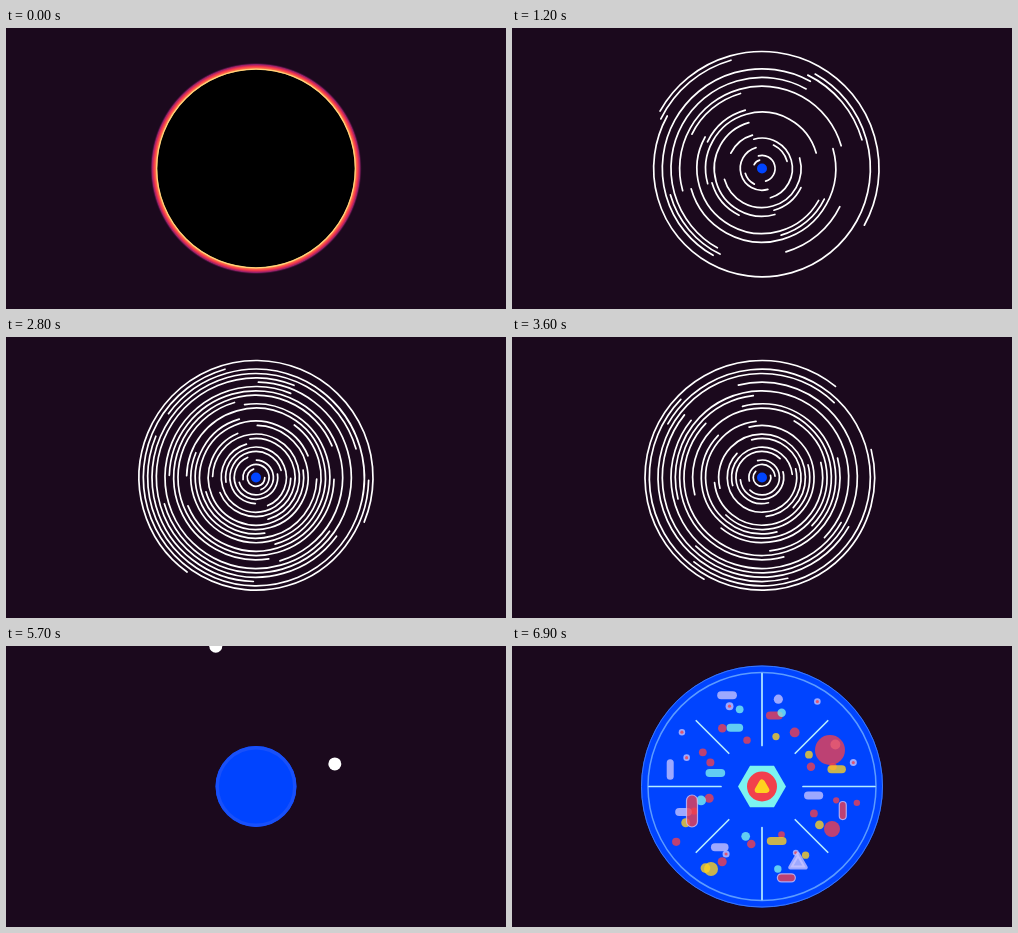
Write an HTML page with a canvas that moves like this. It is 500 px wide and 281 px high and loops after 7 s.

```html
<!DOCTYPE html>
<html>
<head>
<meta charset="utf-8">
<style>
html, body { margin: 0; width: 100%; height: 100%; overflow: hidden; background: #1b091d; }
canvas { display: block; width: 100vw; height: 100vh; }
</style>
</head>
<body>
<canvas id="stage" width="500" height="281"></canvas>
<script>
const canvas = document.getElementById('stage');
const ctx = canvas.getContext('2d');
const W = 500, H = 281, CX = 250, CY = 140.5, TAU = Math.PI * 2;
const BG = '#1b091d', BLUE = '#0044ff', RED = '#f2404c', YELLOW = '#ffd21f',
      CYAN = '#7cf3f0', LILAC = '#c9c4ff', PALE = '#b4ecff';

const rad = deg => deg * Math.PI / 180;
const progress = (t, from, to) => Math.min(1, Math.max(0, (t - from) / (to - from)));
const easeOut = (p, power) => 1 - (1 - p) ** power;
const easeInOut = p => (1 - Math.cos(Math.PI * p)) / 2;

function seeded(seed) {
  return () => (seed = (seed * 16807) % 2147483647) / 2147483647;
}

function disc(x, y, r, color) {
  ctx.fillStyle = color;
  ctx.beginPath();
  ctx.arc(x, y, Math.max(0, r), 0, TAU);
  ctx.fill();
}

function circle(r, color, width) {
  ctx.strokeStyle = color;
  ctx.lineWidth = width;
  ctx.beginPath();
  ctx.arc(CX, CY, Math.max(0, r), 0, TAU);
  ctx.stroke();
}

function polygon(x, y, r, sides, turn, color, rounding = 0) {
  ctx.beginPath();
  for (let i = 0; i < sides; i++) {
    const a = turn + i * TAU / sides;
    ctx.lineTo(x + r * Math.cos(a), y + r * Math.sin(a));
  }
  ctx.closePath();
  ctx.fillStyle = ctx.strokeStyle = color;
  ctx.fill();
  if (!rounding) return;
  ctx.lineWidth = rounding;
  ctx.lineJoin = 'round';
  ctx.stroke();
}

function eclipse() {
  const glow = ctx.createRadialGradient(CX, CY, 98, CX, CY, 106);
  ['#ffc45a', '#ff7a48', '#f5364c', '#96206a', 'rgba(27,9,29,0)']
    .forEach((color, i) => glow.addColorStop(i / 4, color));
  disc(CX, CY, 106, glow);
  disc(CX, CY, 99, '#000');
  circle(99.3, '#ffd27a', 1.3);
}

// Start of each ring in eighths of a turn, outermost first
const STARTS = [7, 2, 3, 0, 1, 4, 1, 6, 0, 2, 4, 6, 3, 2, 0, 4, 2, 6, 4, 2, 6, 0, 2, 4, 6, 2];

// Adds one three-quarter arc to the path; every other ring runs late
function addArc(index, eighth, t) {
  const late = index % 2;
  const head = easeOut(progress(t, late ? 1.03 : 0.13, 4.6), 4);
  const tail = easeInOut(progress(t, 2.5 + 0.45 * late, 5.5 + 0.45 * late));
  if (head - tail < 0.002) return;
  const start = 16 + eighth * 45, r = 117 - index * 4.33;
  const from = -rad(start + 270 * tail), to = -rad(start + 270 * head);
  ctx.moveTo(CX + r * Math.cos(from), CY + r * Math.sin(from));
  ctx.arc(CX, CY, r, from, to, true);
}

function rings(t) {
  ctx.strokeStyle = '#fff';
  ctx.lineWidth = 1.7;
  ctx.lineCap = 'round';
  ctx.beginPath();
  STARTS.forEach((eighth, i) => addArc(i, eighth, t));
  addArc(2, 5, t);
  ctx.stroke();
}

// White balls rush in one after another
function balls(t) {
  [286, 196, 16, 106].forEach((angle, i) => {
    const d = 1640 * (5.672 + 0.039 * i - t);
    if (d > 0 && d < 330) disc(CX + d * Math.cos(rad(angle)), CY - d * Math.sin(rad(angle)), 6.5, '#fff');
  });
}

function pill(x, y, w, h, color, outlined) {
  ctx.beginPath();
  ctx.roundRect(x - w / 2, y - h / 2, w, h, Math.min(w, h) / 2);
  ctx.fillStyle = color;
  ctx.fill();
  if (!outlined) return;
  ctx.strokeStyle = LILAC;
  ctx.lineWidth = 1.2;
  ctx.stroke();
}

// Dots and pills scattered over the eight sectors, in six rows outward
function contents(shown) {
  const random = seeded(4711);
  const colors = [RED, RED, RED, LILAC, LILAC, YELLOW, CYAN];
  ctx.globalAlpha = 0.78 * shown;
  for (let i = 0; i < 48; i++) {
    const row = Math.floor(i / 8);
    const angle = (i % 8 + 0.2 + 0.6 * random()) * TAU / 8;
    const d = 46 + (row + random()) * 9.5;
    const x = CX + d * Math.cos(angle), y = CY + d * Math.sin(angle);
    const color = colors[Math.floor(random() * colors.length)];
    const size = random();
    if (i % 4 === row % 4) {
      const length = 15 + 6 * size, upright = random() < 0.2;
      pill(x, y, upright ? 7 : length, upright ? length : 8, color, color === RED && size > 0.5);
    } else {
      disc(x, y, (3 + 2 * size) * shown, color);
      if (color === LILAC && size < 0.5) disc(x, y, 1.6 * shown, RED);
    }
  }
  disc(318, 104, 15 * shown, RED);
  disc(320, 183, 8 * shown, RED);
  disc(199, 223, 7 * shown, YELLOW);
  pill(180, 165, 11, 32, RED, true);
  polygon(286, 217, 9 * shown, 3, -Math.PI / 2, LILAC, 4);
  ctx.globalAlpha = 1;
}

function spokes(open) {
  ctx.strokeStyle = PALE;
  ctx.lineWidth = 1.7;
  ctx.lineCap = 'round';
  ctx.beginPath();
  for (let i = 0; i < 8; i++) {
    const inner = i % 2 ? 47 : 41, outer = i % 2 ? 93 : 113;
    const end = inner + (outer - inner) * open;
    const c = Math.cos(i * TAU / 8), s = Math.sin(i * TAU / 8);
    ctx.moveTo(CX + inner * c, CY + inner * s);
    ctx.lineTo(CX + end * c, CY + end * s);
  }
  ctx.stroke();
}

function wheel(t) {
  const r = 5 + 116 * easeOut(progress(t, 5.6, 6.4), 2.73);
  const open = progress(t, 5.9, 6.3), shown = progress(t, 6.2, 6.7);
  disc(CX, CY, r, BLUE);
  if (t < 5.65) return;
  if (!open) return circle(r - 1.7, '#1850fa', 3.4);
  circle(r - 0.5, '#3c78f5', 1);
  circle(r - 7, '#5c9cff', 1.5);
  spokes(open);
  polygon(CX, CY, 24 * open, 6, 0, CYAN);
  disc(CX, CY, 15 * open, RED);
  polygon(CX, CY + 1, 5 * open, 3, -Math.PI / 2, YELLOW, 6 * open);
  if (shown) contents(shown);
}

function draw(t) {
  ctx.fillStyle = BG;
  ctx.fillRect(0, 0, W, H);
  if (t < 0.1) return eclipse();
  if (t < 5.65) rings(t);
  balls(t);
  wheel(t);
}

// The picture advances ten times a second
const began = performance.now();
function tick() {
  const ms = Math.max(0, performance.now() - began) % 7000;
  draw(Math.floor(ms / 100) / 10);
  requestAnimationFrame(tick);
}
tick();
</script>
</body>
</html>
```
